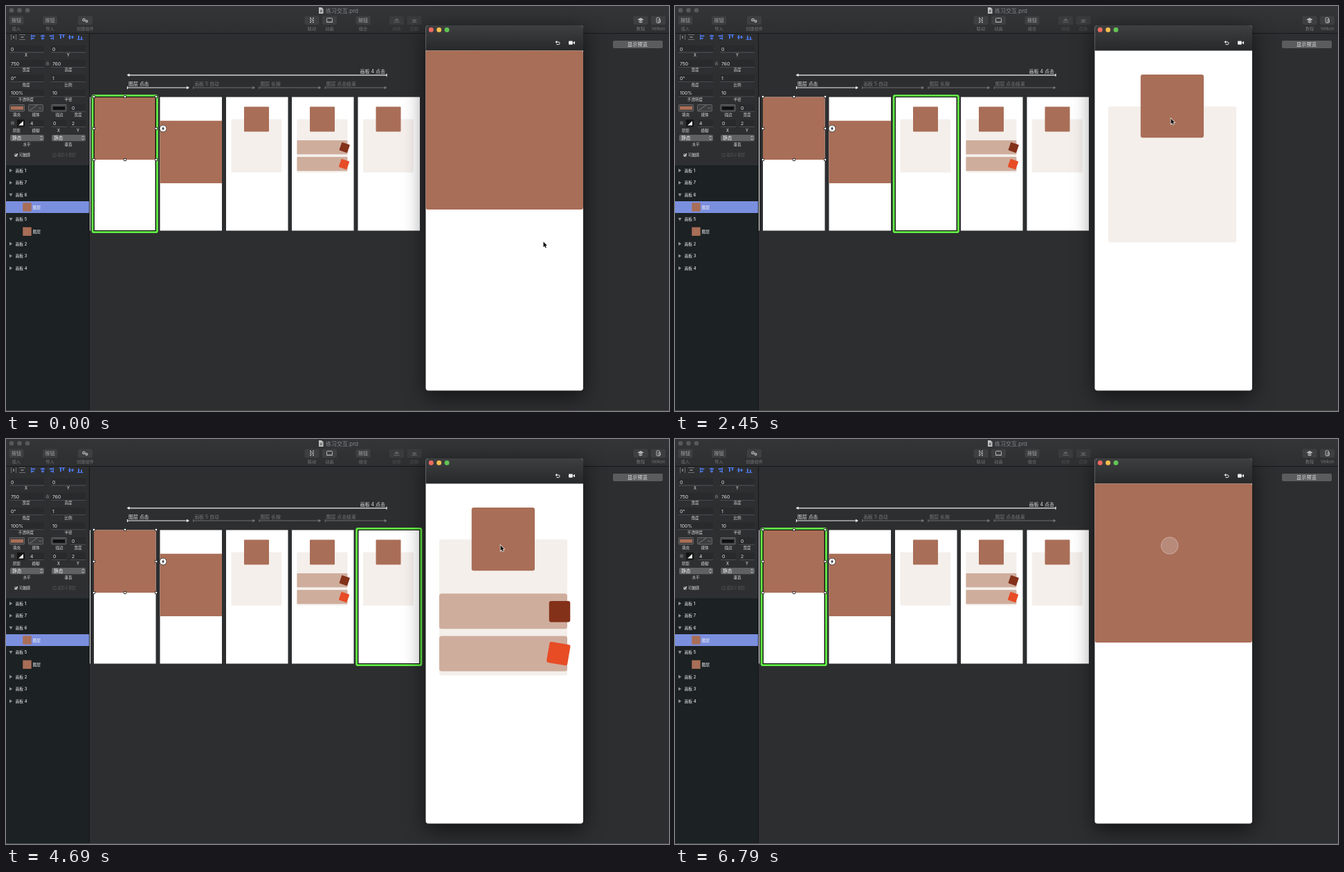
Write an HTML page with a canvas that moves like this. It is 958 by 585 pixels and loops after 6.86 s.

```html
<!DOCTYPE html>
<html lang="zh">
<head>
<meta charset="utf-8">
<title>练习交互</title>
<style>
  html, body { margin: 0; width: 100%; height: 100%; overflow: hidden; background: #2d2e30; }
  canvas, svg { position: absolute; left: 0; top: 0; width: 958px; height: 585px; }
  text { font-family: Inter, "Noto Sans CJK SC", "Noto Sans CJK", sans-serif; }
</style>
</head>
<body>
<canvas id="stage" width="958" height="585"></canvas>
<svg id="labels" viewBox="0 0 958 585"></svg>
<script>
const W = 958, H = 585, LOOP = 6860;
const BROWN = '#a96e57', CARD = '#f4efeb', BAR = '#cfad9d', DARK = '#84311a', ORANGE = '#e74c25';
const BOARDS = [127, 222.5, 318, 413, 508.5], BW = 89.5, BY = 131.5, BH = 193;

const stage = document.getElementById('stage');
const screen = stage.getContext('2d');
const base = document.createElement('canvas');
base.width = W; base.height = H;
let g = base.getContext('2d');

// ---------- drawing helpers ----------
function box(x, y, w, h, fill, r = 0) {
  g.fillStyle = fill;
  g.beginPath();
  g.roundRect(x, y, w, h, r);
  g.fill();
}
function frame(x, y, w, h, color, lw = 1, r = 0) {
  g.strokeStyle = color; g.lineWidth = lw;
  g.beginPath();
  g.roundRect(x, y, w, h, r);
  g.stroke();
}
function dot(x, y, r, fill) {
  g.fillStyle = fill;
  g.beginPath();
  g.arc(x, y, r, 0, 7);
  g.fill();
}
function line(color, lw, ...p) {
  g.strokeStyle = color; g.lineWidth = lw;
  g.beginPath();
  for (let i = 0; i < p.length; i += 2) g.lineTo(p[i], p[i + 1]);
  g.stroke();
}
function poly(fill, ...p) {
  g.fillStyle = fill;
  g.beginPath();
  for (let i = 0; i < p.length; i += 2) g.lineTo(p[i], p[i + 1]);
  g.fill();
}
function tilted(x, y, s, deg, fill, r) {
  g.save();
  g.translate(x, y);
  g.rotate(deg * Math.PI / 180);
  box(-s / 2, -s / 2, s, s, fill, r);
  g.restore();
}
function gradient(y0, y1, a, b) {
  const q = g.createLinearGradient(0, y0, 0, y1);
  q.addColorStop(0, a);
  q.addColorStop(1, b);
  return q;
}
// y is the vertical middle of the line of text
function label(str, x, y, size, color, anchor = 'middle', weight = 400) {
  const n = document.createElementNS('http://www.w3.org/2000/svg', 'text');
  n.setAttribute('x', x);
  n.setAttribute('y', y + size * 0.37);
  n.setAttribute('font-size', size);
  n.setAttribute('font-weight', weight);
  n.setAttribute('fill', color);
  n.setAttribute('text-anchor', anchor);
  n.textContent = str;
  document.getElementById('labels').append(n);
}

// ---------- static interface ----------
function toolbar() {
  box(0, 0, W, 39, gradient(0, 39, '#343537', '#2e2f31'));
  box(0, 39, W, 1, '#18191a');
  for (const x of [8, 19.5, 31]) dot(x, 6.3, 3.3, '#58595b');
  poly('#c4c4c4', 452, 2, 456, 2, 458.5, 4.5, 458.5, 11, 452, 11);
  line('#555', 0.9, 453.5, 6, 457, 6, 453.5, 8.5, 457, 8.5);
  label('练习交互.prd', 462, 6.8, 8, '#85868a', 'start');

  const tools = [[15, '插入'], [63.5, '导入'], [114.5, '创建组件'], [442, '联动'], [467.5, '动画'],
    [516, '组合'], [564.5, '前移', 1], [590, '后移', 1], [917, '教程'], [942.5, 'Velkon']];
  for (const [x, name, dim] of tools) {
    box(x - 10.5, 14.5, 21, 12.5, dim ? '#3a3b3d' : '#3e3f41', 2);
    label(name, x, 32.3, 6.2, dim ? '#4c4d4f' : '#747577');
  }
  for (const x of [15, 63.5, 516]) label('按钮', x, 20.8, 7, '#a4a5a7');

  const c = '#b4b5b7';
  g.strokeStyle = c; g.lineWidth = 1.3;
  for (const [x, y, r] of [[112.5, 20, 1.7], [116.5, 22, 1.4]]) {
    g.beginPath(); g.arc(x, y, r, 0, 7); g.stroke();
  }
  for (const y of [17.5, 20.5, 23.5]) { box(439, y - .8, 2, 1.6, c); box(443, y - .8, 2, 1.6, c); }
  line(c, 0.8, 440, 18, 444, 20.5, 440, 23.5);
  frame(463.5, 17.5, 8, 6, c, 1, 1);
  line(c, 1.2, 463, 23.3, 472, 23.3);
  for (const [x, d] of [[564.5, -1], [590, 1]]) {
    poly('#606163', x - 4, 20.5 - d, x + 4, 20.5 - d, x, 20.5 + d * 3);
    line('#606163', 1, x - 4, 23.5, x + 4, 23.5);
  }
  poly(c, 912.5, 19.5, 917, 17, 921.5, 19.5, 917, 22);
  line(c, 1.6, 914.5, 22.5, 917, 23.7, 919.5, 22.5);
  frame(940, 16.8, 4.5, 7.5, c, 1, 1);
  frame(942.5, 19.5, 3, 4.5, c, 0.8, 0.5);

  box(877, 50, 72, 11, '#5b5c5e', 2);
  label('显示预览', 912.5, 55.6, 7.2, '#e6e6e6');
}

function field(str, x, y, w) {
  box(x, y - 5.5, w, 10.5, '#292a2c');
  box(x, y + 4.6, w, 0.8, '#56575a');
  label(str, x + 2, y, 6.8, '#e2e2e2', 'start');
}
function caption(str, x, y) { label(str, x, y, 5.6, '#d6d6d6', 'middle', 500); }

function alignIcons() {
  const grey = '#747577', blue = '#4a73de';
  for (const e of [-3.5, 3.5]) {
    line(grey, 0.9, 11 + e, 41, 11 + e, 49);
    line(grey, 0.9, 19, 45 + e, 28, 45 + e);
  }
  box(10, 43, 2, 4, grey);
  box(21.5, 44, 4, 2, grey);
  [[40, -3.5], [53, 0], [65, 3.5]].forEach(([x, e]) => {
    line(blue, 1, x + e, 41, x + e, 49);
    box(x - 3 + e * .2, 42.3, 6, 2, blue);
    box(x - 2 + e * .4, 45.8, 4, 2, blue);
  });
  [[81, -3.5], [94, 0], [107, 3.5]].forEach(([x, e]) => {
    line(blue, 1, x - 4.5, 45 + e, x + 4.5, 45 + e);
    box(x - 3, 42 + e * .2, 2, 6, blue);
    box(x + 1, 43 + e * .4, 2, 4, blue);
  });
}

function inspector() {
  box(0, 40, 120, 190, '#2e2f31');
  alignIcons();
  const rows = [['0', '0', 'X', 'Y'], ['750', '760', '宽度', '高度'],
    ['0°', '1', '角度', '比例'], ['100%', '10', '不透明度', '半径']];
  rows.forEach(([a, b, ca, cb], i) => {
    const y = 62 + i * 21.3;
    field(a, 5, y, 50);
    field(b, 65, y, 50);
    caption(ca, 29, y + 9);
    caption(cb, 90, y + 9);
  });
  frame(58.5, 83, 3, 2, '#707173', 0.8);
  line('#707173', 0.7, 59, 83, 59, 81, 61, 81, 61, 83);

  for (const x of [5, 32, 65.5]) {
    box(x, 142, 22, 10.5, '#3c3d3f', 1);
    frame(x + .5, 142.5, 21, 9.5, '#707173', 0.8, 1);
  }
  box(7, 144.8, 18, 5, BROWN);
  line('#8a8b8d', 0.8, 34, 151, 45, 143);
  line('#8a8b8d', 0.8, 47.5, 146.5, 49.5, 148.5, 51.5, 146.5);
  box(68, 144.5, 17, 5.5, '#111');
  line('#8a8b8d', 0.6, 68, 144.5, 85, 144.5);
  field('0', 93, 147.3, 22);
  ['填充', '媒体', '描边', '宽度'].forEach((s, i) => caption(s, [15.5, 43, 77, 104][i], 156.8));

  box(7, 166.5, 5, 5, '#5a5b5d', 1);
  box(16, 164, 11, 10.5, '#141414', 1);
  poly('#eee', 18, 172.5, 25, 172.5, 25, 166);
  field('4', 33, 169.5, 22); field('0', 66, 169.5, 22); field('2', 93, 169.5, 22);
  ['阴影', '模糊', 'X', 'Y'].forEach((s, i) => caption(s, [15.5, 43, 76, 104][i], 179.5));

  [[6, '水平'], [66, '垂直']].forEach(([x, s]) => {
    box(x, 186, 49, 9.3, '#606163', 2);
    label('静态', x + 3, 190.6, 6.8, '#f0f0f0', 'start');
    line('#e8e8e8', 0.8, x + 43.5, 189.6, x + 45.2, 187.8, x + 46.9, 189.6);
    line('#e8e8e8', 0.8, x + 43.5, 191.6, x + 45.2, 193.4, x + 46.9, 191.6);
    caption(s, x + 24, 199.8);
  });
  box(12, 213, 5, 5, '#727375', 1);
  line('#fff', 1, 12.8, 215.5, 14.2, 217, 16.8, 213);
  label('可触摸', 19, 215.5, 5.4, '#e0e0e0', 'start', 500);
  frame(68, 213.2, 4.3, 4.5, '#555658', 0.8, 1);
  label('裁剪子图层', 74.5, 215.5, 5.3, '#555658', 'start');
}

function layers() {
  box(0, 230, 120, 355, '#1c2123');
  box(0, 282, 120, 17, '#7b8fdf');
  ['画板 1', '画板 7', '画板 6', '', '画板 5', '', '画板 2', '画板 3', '画板 4'].forEach((s, i) => {
    const y = 237.6 + i * 17.63;
    if (!s) {
      box(24.3, y - 6.2, 12.4, 12.4, BROWN);
      label('图层', 38.5, y, 5.8, '#f4f4f4', 'start', 500);
      return;
    }
    const c = '#8d9092';
    if (i === 2 || i === 4) poly(c, 4.5, y - 2, 9.5, y - 2, 7, y + 2.4);
    else poly(c, 5, y - 2.6, 9.2, y, 5, y + 2.6);
    label(s, 13.5, y, 5.8, '#ececec', 'start', 500);
  });
  box(120, 40, 1, 545, '#151617');
}

function arrow(x0, x1, y, color, lw = 1) {
  const d = Math.sign(x1 - x0);
  line(color, lw, x0, y, x1 - d * 2, y);
  line(color, lw, x0, y - 2, x0, y + 2);
  poly(color, x1, y, x1 - d * 4, y - 2.2, x1 - d * 4, y + 2.2);
}

function boards() {
  const hi = '#f2f2f2', lo = '#77787a';
  arrow(550, 174.5, 99.8, hi, 1.2);
  label('画板 4 点击', 548, 94, 7, '#dadada', 'end');
  ['图层 点击', '画板 5 自动', '图层 长按', '图层 点击结束'].forEach((s, i) => {
    arrow(175.5 + i * 95.2, 265 + i * 95.2, 118, i ? lo : hi, i ? 0.9 : 1.2);
    label(s, 177 + i * 95.2, 112, 6.9, i ? lo : '#e6e6e6', 'start');
  });

  box(121, BY, 1, BH, '#e8e8e8');
  for (const x of BOARDS) box(x, BY, BW, BH, '#fff');
  box(127, 131.5, BW, 90.5, BROWN);
  box(222.5, 165.8, BW, 90.2, BROWN);
  BOARDS.slice(2).forEach((x, i) => {
    box(x + 7.4, 163.6, 73, 77, CARD, 1);
    box(x + 26, 145.4, 36, 36, BROWN, 1);
    if (i !== 1) return;
    for (const y of [194, 218]) box(x + 7.4, y, 73, 20.3, BAR, 1);
    tilted(x + 76.2, 204.4, 12.3, 19, DARK, 1);
    tilted(x + 75.5, 228.5, 12.3, 19, ORANGE, 1);
  });
}

function selection() {
  for (const x of [127, 172, 217]) for (const y of [131, 177, 222]) {
    if (x === 172 && y === 177) continue;
    box(x - 2, y - 2, 4, 4, '#222');
    box(x - 1.2, y - 1.2, 2.4, 2.4, '#fff');
  }
  dot(227, 177, 5.2, '#222');
  dot(227, 177, 4.6, '#fff');
  poly('#111', 228, 173.6, 225, 177.5, 226.9, 177.5, 226, 180.4, 229, 176.4, 227.1, 176.4);
}

function previewWindow() {
  g.save();
  g.shadowColor = 'rgba(0,0,0,.6)';
  g.shadowBlur = 30;
  g.shadowOffsetY = 8;
  box(606.5, 28, 227.5, 527.5, '#fff', 4);
  g.restore();
  box(606.5, 28, 227.5, 36.5, gradient(28, 65, '#3e3f41', '#27282a'), [4, 4, 0, 0]);
  ['#ed6a5e', '#f4be4f', '#62c454'].forEach((c, i) => dot(614.3 + i * 11.4, 34.4, 3.45, c));
  const c = '#f0f0f0';
  line(c, 1, 795, 52, 798.5, 52);
  g.beginPath(); g.arc(798.3, 53.8, 1.8, -1.57, 1.57); g.lineTo(795.5, 55.6); g.stroke();
  poly(c, 793.6, 52, 796.2, 49.8, 796.2, 54.2);
  box(813, 50.5, 5.8, 5.2, c, 1);
  poly(c, 819, 53, 822, 50.8, 822, 55.4);
}

box(0, 0, W, H, '#2d2e30');
boards();
inspector();
layers();
toolbar();
box(0, 584, W, 1, '#4a4c4e');

// The window sits above the highlight, so it gets its own layer.
const windowLayer = document.createElement('canvas');
windowLayer.width = W; windowLayer.height = H;
g = windowLayer.getContext('2d');
previewWindow();
g = screen;

// ---------- motion ----------
const clamp = v => Math.max(0, Math.min(1, v));
const span = (t, a, b) => clamp((t - a) / (b - a));
const mix = (a, b, p) => a + (b - a) * p;
const quad = p => p < .5 ? 2 * p * p : 1 - 2 * (1 - p) ** 2;
const cubic = p => p < .5 ? 4 * p ** 3 : 1 - 4 * (1 - p) ** 3;
const out = (p, n) => 1 - (1 - p) ** n;

const DROP = 1405, SHRINK = 1570, HOLD = 3430, RELEASE = 4550, RESET = 6160;
const TOUCHES = [[1330, 1450], [2920, RELEASE], [6020, RESET], [6730, 7000]];
const PATH = [[0, 777, 341], [350, 785, 398], [700, 763, 382], [1300, 740, 213],
  [2170, 740, 213], [2450, 717, 163], [2750, 715, 154], [LOOP, 715, 154]];

function pointer(t) {
  const i = PATH.findIndex((p, n) => n && t <= p[0]);
  const [a, x0, y0] = PATH[i - 1], [b, x1, y1] = PATH[i];
  const p = span(t, a, b), e = p * p * (3 - 2 * p);
  return [mix(x0, x1, e), mix(y0, y1, e)];
}

// Middle and size of the big block
function block(t) {
  const full = { x: 720.25, y: 179.2, w: 227.5, h: 229.6 };
  const small = { x: 718.4, y: 144.6, w: 91.2, h: 91.2 };
  const blend = (a, b, p, q) => ({ x: mix(a.x, b.x, p), y: mix(a.y, b.y, q), w: mix(a.w, b.w, p), h: mix(a.h, b.h, p) });
  if (t < SHRINK) return { ...full, y: mix(179.2, 266, quad(span(t, DROP, 1560))) };
  if (t < RESET) {
    const p = span(t, SHRINK, 1970);
    return blend({ ...full, y: 266 }, small, quad(p), cubic(p));
  }
  const p = quad(span(t, RESET, 6480));
  return blend(small, full, p, p);
}

function bars(t) {
  const p = t < RELEASE ? out(span(t, HOLD, 3890), 3) : 1 - cubic(span(t, 4780, 5150));
  if (p <= 0) return;
  for (const y of [223.2, 284.4]) box(626, y, 185 * p, 51, BAR, Math.min(3.5, 92 * p));
}

function chips(t) {
  if (t < HOLD || t > 5050) return;
  const back = t >= RELEASE;
  const px = back ? 1 - quad(span(t, 4800, 5050)) : out(span(t, HOLD, 3990), 2);
  const chip = (dx, drop, end, lag, color) => {
    const py = back ? 1 - quad(span(t, 4700, 4900)) : quad(span(t, 3710 + lag, 4130 + lag));
    const turn = back ? 1 - span(t, RELEASE, end) : out(span(t, HOLD, 3890), 3);
    const size = back ? 30.5 : mix(33.5, 30.5, py);
    tilted(mix(718, 800, px) + dx, mix(145, 145 + drop, py), size, 19 * turn, color, 3);
  };
  g.save();
  g.globalAlpha = clamp((px - .05) * 2);
  chip(-1.7, 165, 4835, 40, ORANGE);
  chip(0, 104.2, 4690, 0, DARK);
  g.restore();
}

function highlight(t) {
  const step = [DROP, SHRINK, HOLD, RELEASE].filter(s => t >= s).length;
  const x = BOARDS[t < RESET ? step : 0];
  frame(x - .6, BY - .9, BW + 1.2, BH + 1.8, '#0c120c', 3, 1);
  frame(x - 1.9, BY - 2.2, BW + 3.8, BH + 4.4, '#63ee46', 2.8, 2);
}

function cursor(t) {
  const [x, y] = pointer(t);
  const touch = TOUCHES.find(([a, b]) => t >= a && t < b);
  if (touch) {
    const a = span(t, touch[0], touch[0] + 140);
    dot(x - .3, y, 12.6, `rgba(232,232,232,${.55 * a})`);
    g.strokeStyle = `rgba(240,225,218,${.25 + .35 * a})`;
    g.lineWidth = 0.9;
    g.beginPath(); g.arc(x - .3, y, 12.2, 0, 7); g.stroke();
    return;
  }
  g.save();
  g.translate(x - .5, y - .5);
  g.beginPath();
  for (const [a, b] of [[0, 0], [0, 7.8], [1.8, 6.2], [3, 9], [4.3, 8.4], [3.2, 5.8], [5.4, 5.6]]) g.lineTo(a, b);
  g.closePath();
  g.strokeStyle = '#fff'; g.lineWidth = 1.3; g.stroke();
  g.fillStyle = '#111'; g.fill();
  g.restore();
}

function draw(t) {
  g.drawImage(base, 0, 0);
  highlight(t);
  selection();
  g.drawImage(windowLayer, 0, 0);
  if (t >= SHRINK && t < RESET) box(626, 145, 185, 196.4, CARD, 2.5);
  bars(t);
  const b = block(t);
  box(b.x - b.w / 2, b.y - b.h / 2, b.w, b.h, BROWN, 3);
  chips(t);
  cursor(t);
}

function tick() {
  draw(performance.now() % LOOP);
  requestAnimationFrame(tick);
}
tick();
</script>
</body>
</html>
```
